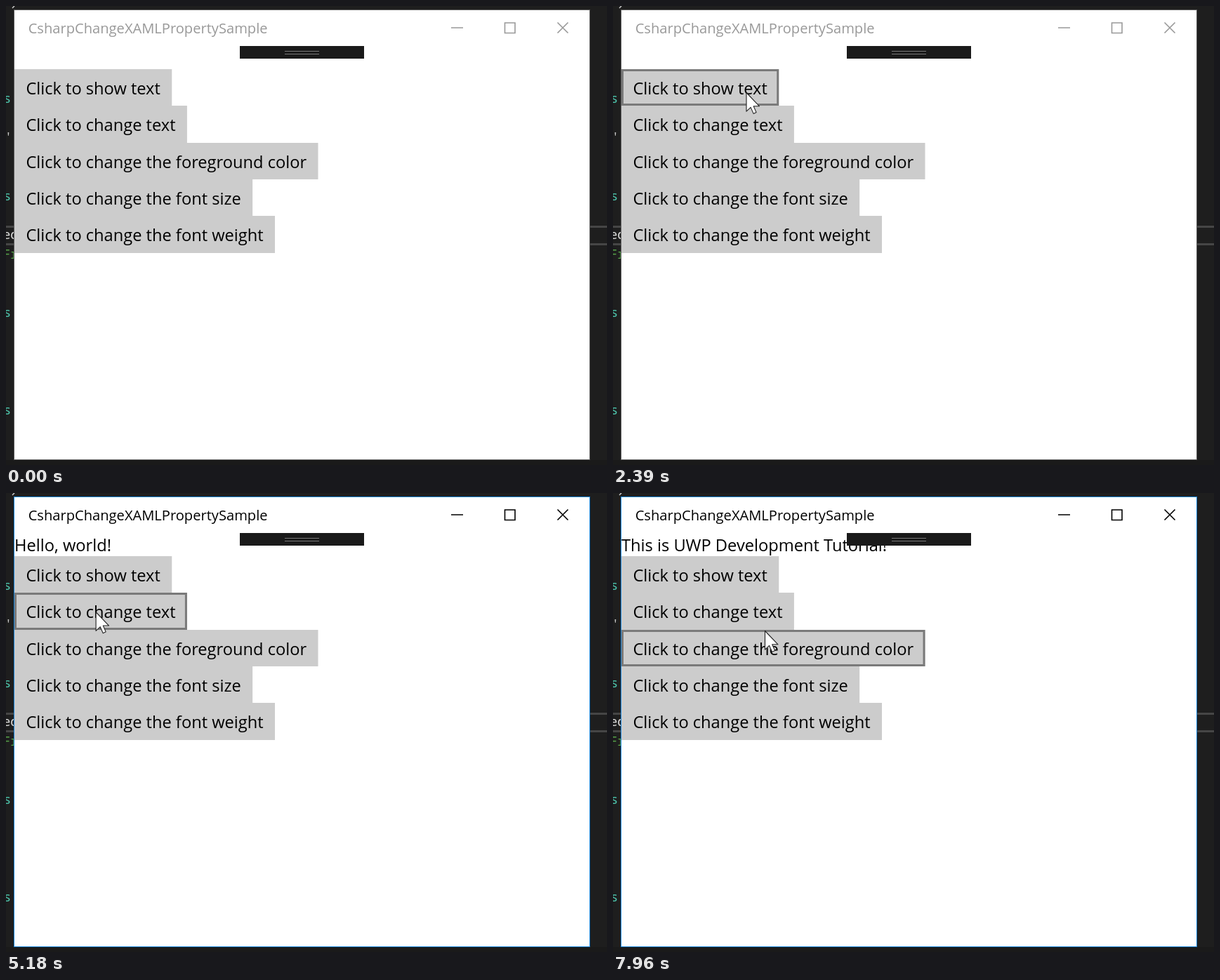
Write an HTML page that moves like this. It is 856 px wide and 654 px high and loops after 8 s.

```html
<!DOCTYPE html>
<html lang="en">
<head>
<meta charset="utf-8">
<title>Change properties</title>
<style>
  html, body { margin: 0; width: 100%; height: 100%; overflow: hidden; background: #1e1e1e; }
  svg { display: block; width: 100%; height: 100%; }
  text { font-family: "Open Sans", "Noto Sans", sans-serif; font-size: 23.65px; white-space: pre; }
  .code text { font-family: "Noto Sans Mono", "DejaVu Sans Mono", monospace; font-size: 18px; }
  .crisp { shape-rendering: crispEdges; }
  .button { transform-box: fill-box; transform-origin: center; }
  .border { fill: none; stroke: #7a7a7a; stroke-width: 3; }
  #window { --ink: #999; --edge: #5c5c5c; }
  #window.active { --ink: #000; --edge: #1883d7; }
  .frame { fill: #fff; stroke: var(--edge); }
  #window .title { fill: var(--ink); font-size: 20.13px; }
  .caption { fill: none; stroke: var(--ink); stroke-width: 1.6; }
</style>
</head>
<body>
<svg viewBox="0 0 856 654" preserveAspectRatio="none">
  <rect width="856" height="654" fill="#1e1e1e"/>
  <rect y="647" width="856" height="7" fill="#1a1a1a"/>
  <g class="code">
    <path class="crisp" d="M0 314.5H856M0 339.5H856" stroke="#464646" stroke-width="3"/>
    <path d="M9 3l3-3" stroke="#ccc" stroke-width="1.5"/>
    <g fill="#4ec9b0">
      <text x="-3.6" y="138">s</text>
      <text x="-3.6" y="277">s</text>
      <text x="-3.6" y="443">s</text>
      <text x="-3.6" y="582">s</text>
    </g>
    <text x="-2" y="193" fill="#c8c8c8">';</text>
    <text x="-4.5" y="332" fill="#dcdcdc">ed</text>
    <text x="-4.5" y="360" fill="#57a64a">Fr</text>
  </g>
  <g id="window">
    <rect class="frame crisp" x="11.5" y="5.5" width="820" height="641"/>
    <text class="title" x="31.7" y="38.5">CsharpChangeXAMLPropertySample</text>
    <path class="caption" d="M634 31H651M710.5 24H725V38.5H710.5ZM785.5 23.5L800.5 38.5M800.5 23.5L785.5 38.5"/>
    <text id="message" x="12" y="83"></text>
    <g class="crisp">
      <rect x="333" y="57" width="177" height="18" fill="#1a1a1a"/>
      <path d="M397 64.5H446M397 68.5H446" stroke="#777"/>
    </g>
    <g id="buttons"></g>
  </g>
  <path id="cursor" d="M.5 .5V27.2L6.6 21.4L10.6 30.4L14.6 28.6L10.7 19.8H19Z" fill="#fff" stroke="#222" stroke-width="1.1" stroke-linejoin="round"/>
</svg>
<script>
  const LOOP = 8000, STEP = 77;
  const LEFT = 12, TOP = 90, ROW = 52.3, PADDING = 16.4;
  const SVG = "http://www.w3.org/2000/svg";
  const [win, message, cursor, list] =
    ["window", "message", "cursor", "buttons"].map(id => document.getElementById(id));

  function add(parent, tag, attrs) {
    const node = document.createElementNS(SVG, tag);
    for (const key in attrs) node.setAttribute(key, attrs[key]);
    return parent.appendChild(node);
  }

  const buttons = ["show text", "change text", "change the foreground color",
    "change the font size", "change the font weight"].map((action, i) => {
    const top = Math.round(TOP + ROW * i);
    const height = Math.round(TOP + ROW * (i + 1)) - top;
    const group = add(list, "g", { class: "button" });
    const fill = add(group, "rect", { x: LEFT, y: top, height });
    const border = add(group, "rect", { class: "border", x: LEFT + 1.5, y: top + 1.5, height: height - 3 });
    const label = add(group, "text", { x: LEFT + PADDING, y: top + 35.6 });
    label.textContent = "Click to " + action;
    const width = label.getComputedTextLength() + 2 * PADDING;
    fill.setAttribute("width", width);
    border.setAttribute("width", width - 3);
    return { group, fill, border, top, bottom: top + height, right: LEFT + width };
  });

  // The pointer rests at each point until the next move begins.
  const ENTER = 210;
  const entry = { x: 685, y: 621 };
  const moves = [
    { start: 290, end: 1070, x: 73, y: 116 },
    { start: 1240, end: 1450, x: 214, y: 124 },
    { start: 1680, end: 1990, x: 46, y: 116 },
    { start: 2240, end: 2390, x: 189.5, y: 123 },
    { start: 3730, end: 4410, x: 53, y: 164 },
    { start: 4490, end: 4720, x: 235, y: 173 },
    { start: 4870, end: 5340, x: 63, y: 167 },
    { start: 5490, end: 5720, x: 198, y: 168 },
    { start: 5950, end: 6260, x: 137.5, y: 167 },
    { start: 7650, end: 7960, x: 216, y: 196 },
  ];

  const clicks = [
    { button: buttons[0], down: 2710, up: 2780, start: 2950, end: 3170, text: "Hello, world!" },
    { button: buttons[1], down: 6410, up: 6580, start: 6730, end: 6960, text: "This is UWP Development Tutorial!" },
  ];

  // Progress in even screen updates; the first one lands at start.
  function progress(t, { start, end }) {
    if (t < start) return 0;
    if (t >= end) return 1;
    const gaps = Math.max(1, Math.round((end - start) / STEP));
    const done = Math.floor((t - start) / (end - start) * gaps + 0.1) + 1;
    return Math.min(1, done / (gaps + 1));
  }

  function cursorAt(t) {
    return moves.reduce((from, move) => {
      const u = progress(t, move) ** 1.4;
      return { x: from.x + (move.x - from.x) * u, y: from.y + (move.y - from.y) * u };
    }, entry);
  }

  function draw(t) {
    const { x, y } = cursorAt(t);
    const present = t >= ENTER;
    cursor.setAttribute("transform", `translate(${x} ${y})`);
    cursor.style.display = present ? "" : "none";

    win.classList.toggle("active", t >= clicks[0].down);
    message.textContent = clicks.reduce((text, c) => t >= c.up ? c.text : text, "");

    for (const b of buttons) {
      const click = clicks.find(c => c.button === b && t >= c.down);
      const held = click && t < click.up;
      const hover = present && x < b.right && y >= b.top && y < b.bottom;
      const shrink = click ? 0.02 * (1 - progress(t, click)) : 0;
      b.fill.setAttribute("fill", held ? "#999" : "#ccc");
      b.border.style.display = hover && !held ? "" : "none";
      b.group.style.transform = shrink ? `scale(${1 - shrink})` : "";
    }
  }

  const origin = performance.now();
  function tick() {
    draw((performance.now() - origin) % LOOP);
    requestAnimationFrame(tick);
  }
  tick();
</script>
</body>
</html>
```
